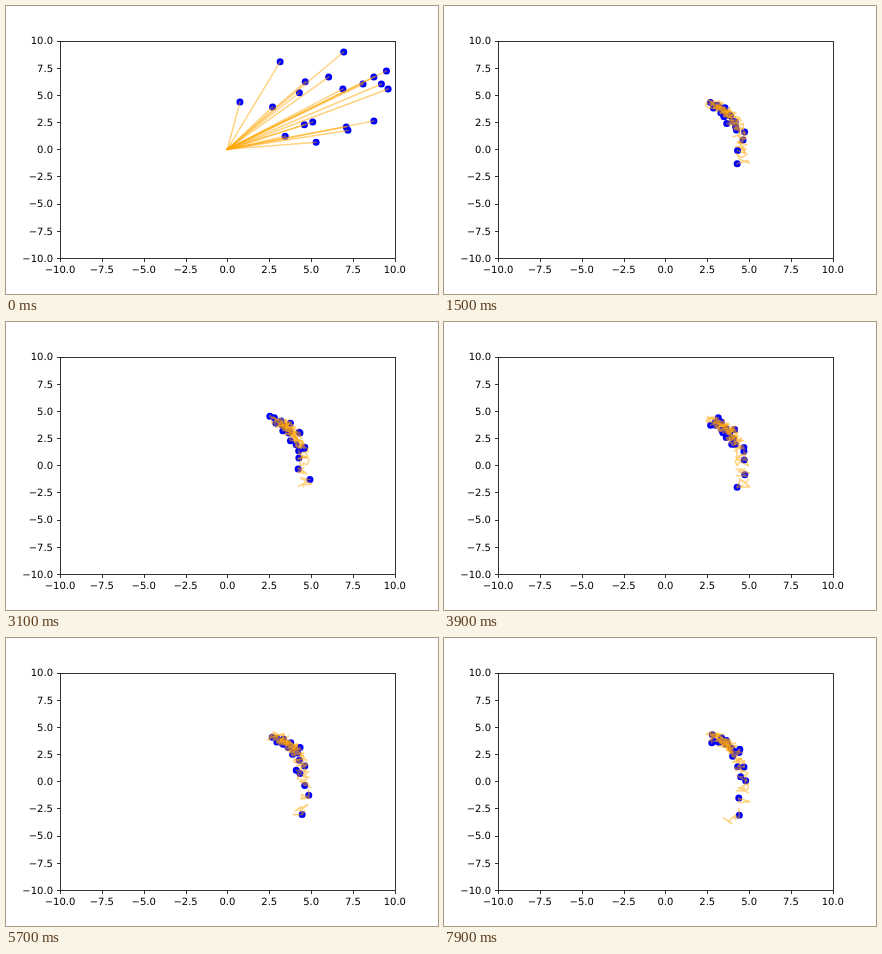
An HTML page for the animation above (8000 ms loop, 432 by 288 pixels).

```html
<!DOCTYPE html>
<html lang="en">
<head>
<meta charset="utf-8">
<title>Particle swarm</title>
<style>
  html, body { margin: 0; width: 100%; height: 100%; overflow: hidden; background: #fff; }
  svg { display: block; width: 432px; height: 288px; }
  text { font: 10px "DejaVu Sans", sans-serif; fill: #000; text-rendering: geometricPrecision; }
  .axis { fill: none; stroke: #000; stroke-width: 0.8; }
  .dot { fill: #00f; }
  .trail { fill: none; stroke: #ffa500; stroke-opacity: 0.5; stroke-width: 1.5; stroke-linecap: square; stroke-linejoin: round; }
</style>
</head>
<body>
<svg viewBox="0 0 432 288"><g id="dots"></g><g id="trails"></g><g id="axes"></g></svg>
<script>
const STEP = 100, STEPS = 80, TRAIL = 9;
const PULL = 0.28, JITTER = 0.42;
const BOX = { left: 54, right: 388.8, top: 34.56, bottom: 252 };

// Starting places in axis units, ordered by where they join the swarm
const STARTS = [
  [3.15, 8.05], [0.75, 4.35], [4.65, 6.2], [2.7, 3.9], [6.05, 6.65],
  [4.3, 5.2], [3.45, 1.2], [6.9, 5.55], [8.1, 6], [6.95, 8.95],
  [9.5, 7.2], [8.75, 6.65], [9.2, 6], [9.6, 5.55], [4.6, 2.25],
  [5.1, 2.5], [8.75, 2.6], [7.1, 2.05], [7.2, 1.75], [5.3, 0.65]
];

// How low the tail of the swarm hangs: [step, y]
const TAIL = [[0, -0.2], [8, -0.35], [22, -1.8], [31, -1.5], [46, -2.1], [67, -4], [79, -2.8]];

const toX = x => BOX.left + (BOX.right - BOX.left) * (x + 10) / 20;
const toY = y => BOX.bottom + (BOX.top - BOX.bottom) * (y + 10) / 20;
const snap = v => Math.floor(v + 0.5) + 0.5;

function add(parent, tag, attrs, text) {
  const el = document.createElementNS("http://www.w3.org/2000/svg", tag);
  for (const key in attrs) el.setAttribute(key, attrs[key]);
  if (text) el.textContent = text;
  return document.getElementById(parent).appendChild(el);
}

let seed = 4711;
function random() {
  seed = (seed * 1664525 + 1013904223) % 4294967296;
  return seed / 4294967296;
}
const jitter = () => (random() * 2 - 1) * JITTER;

function drawAxes() {
  const l = snap(BOX.left), r = snap(BOX.right), t = snap(BOX.top), b = snap(BOX.bottom);
  add("axes", "rect", { class: "axis", x: l, y: t, width: r - l, height: b - t });
  for (let value = -10; value <= 10; value += 2.5) {
    const label = value.toFixed(1).replace("-", "\u2212");
    const x = toX(value), y = toY(value);
    add("axes", "path", { class: "axis", d: `M${snap(x)} ${b}v3.5M${l} ${snap(y)}h-3.5` });
    add("axes", "text", { x, y: 267, "text-anchor": "middle" }, label);
    add("axes", "text", { x: 47, y: Math.round(y + 3.8), "text-anchor": "end" }, label);
  }
}

function tailAt(step) {
  const next = Math.max(1, TAIL.findIndex(([s]) => s >= step));
  const [s0, y0] = TAIL[next - 1], [s1, y1] = TAIL[next];
  return y0 + (y1 - y0) * (step - s0) / (s1 - s0);
}

// The swarm lies on an arc: dense at the top, thinning out into a tail.
function restPlace(rank, step) {
  const y = 4.2 - 2.3 * rank + (tailAt(step) - 1.9) * rank ** 6;
  const bend = 0.5 * Math.max(0, -2 - y);
  const x = 2.8 + 1.85 * (1 - Math.exp((y - 4.2) / 1.3)) - bend;
  return [x, y];
}

function makePath(start, i) {
  const rank = i / (STARTS.length - 1);
  return Array.from({ length: STEPS }, (_, step) => {
    if (step === 0) return [toX(start[0]), toY(start[1])];
    const [x, y] = restPlace(rank, step);
    const far = PULL ** step;
    return [
      toX(x + (start[0] - x) * far + jitter()),
      toY(y + (start[1] - y) * far + jitter())
    ];
  });
}

const particles = STARTS.map((start, i) => ({
  path: makePath(start, i),
  dot: add("dots", "circle", { class: "dot", r: 3.5 }),
  trail: add("trails", "polyline", { class: "trail" })
}));

let shown = -1;
function draw() {
  const step = Math.floor(performance.now() / STEP) % STEPS;
  if (step !== shown) {
    shown = step;
    for (const { path, dot, trail } of particles) {
      const points = path.slice(Math.max(0, step - TRAIL + 1), step + 1);
      if (points.length < TRAIL) points.unshift([toX(0), toY(0)]);
      dot.setAttribute("cx", path[step][0]);
      dot.setAttribute("cy", path[step][1]);
      trail.setAttribute("points", points.join(" "));
    }
  }
  requestAnimationFrame(draw);
}

drawAxes();
draw();
</script>
</body>
</html>
```
